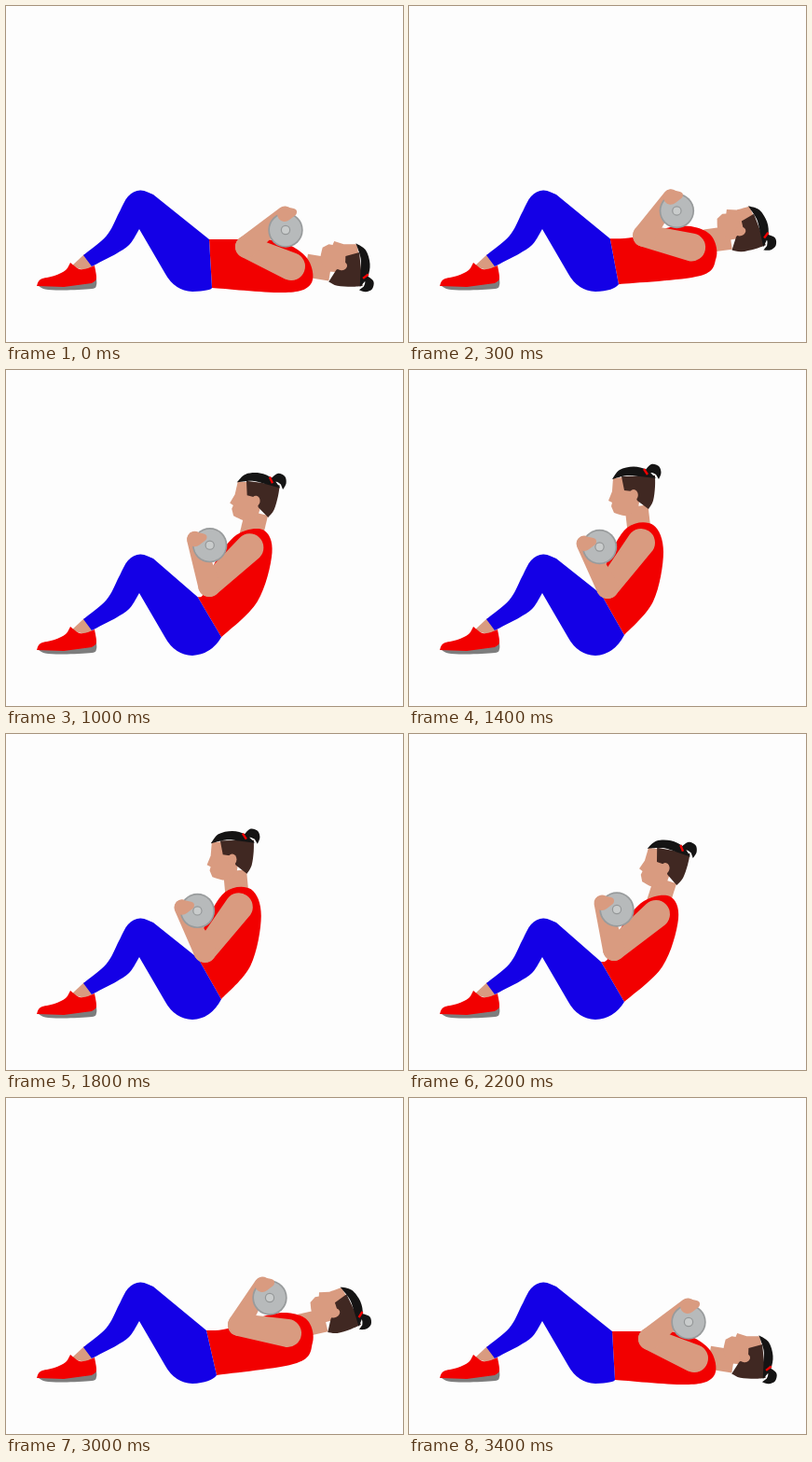
An HTML page with a canvas for the animation above (3500 ms loop, 426 px wide and 360 px high).

```html
<!DOCTYPE html>
<html lang="en">
<head>
<meta charset="utf-8">
<title>Sit-up with weight</title>
<style>
html, body { margin: 0; width: 100%; height: 100%; overflow: hidden; background: #fdfdfd; }
canvas { display: block; width: 426px; height: 360px; }
</style>
</head>
<body>
<canvas id="stage"></canvas>
<script>
const W = 426, H = 360, LOOP = 3500, STEP = 100;
const RED = '#f20000', BLUE = '#1400e6', SKIN = '#d99b80', BROWN = '#402822', BLACK = '#151414';
const canvas = document.getElementById('stage');
const ctx = canvas.getContext('2d');
const dpr = window.devicePixelRatio || 1;
canvas.width = W * dpr;
canvas.height = H * dpr;

// Poses run from lying (0) to upright (4).
const HEAD = [[366, 277, 86], [357.5, 227, 66], [330, 177, 43], [275, 138, 12], [240, 128, 0]];
const NECK = [[322, 278], [316, 244], [303, 210], [267, 182], [247, 172]];
const SHOULDER = [[306, 279], [302, 252], [295, 222], [265, 193], [249, 185]];
const ELBOW = [[258, 258], [250, 243], [238, 234], [220, 231], [213, 233]];
const HAND = [[299, 223], [275, 200], [246, 185], [207, 181], [188, 186]];
const PLATE = [[300, 240], [283, 214], [259.5, 196.5], [223, 188], [204.5, 189.5]];
const TORSO = [
  [218, 250, 250, 250, 280, 250, 308, 258, 326, 275, 327, 298, 300, 307, 221, 302],
  [215, 249, 238, 247, 283, 232, 308, 231, 325, 240, 329, 262, 312, 284, 226, 297],
  [211, 247, 226, 243, 262, 212, 292, 201, 314, 204, 317, 228, 290, 262, 229, 292],
  [206, 244, 214, 240, 228, 207, 252, 179, 280, 174, 289, 198, 272, 249, 231, 287],
  [206, 240, 208, 232, 212, 206, 234, 169, 262, 166, 273, 195, 262, 248, 231, 284]
];
// time (ms), pose
const TIMING = [[0, 0], [600, 2], [1200, 3.7], [1400, 4], [1600, 4.1], [1800, 3.95],
  [2200, 3], [2600, 2.17], [3000, 1], [3400, 0]];

function hermite(a, b, ma, mb, s) {
  const s2 = s * s, s3 = s2 * s;
  return a * (2 * s3 - 3 * s2 + 1) + ma * (s3 - 2 * s2 + s) + b * (3 * s2 - 2 * s3) + mb * (s3 - s2);
}

function poseAt(t) {
  const k = TIMING, last = k.length - 1;
  if (t >= k[last][0]) return k[last][1];
  let i = 0;
  while (t >= k[i + 1][0]) i++;
  const slope = n => n === 0 || n === last ? 0 : (k[n + 1][1] - k[n - 1][1]) / (k[n + 1][0] - k[n - 1][0]);
  const d = k[i + 1][0] - k[i][0];
  return hermite(k[i][1], k[i + 1][1], slope(i) * d, slope(i + 1) * d, (t - k[i][0]) / d);
}

function blend(keys, p) {
  const last = keys.length - 1;
  const i = Math.max(0, Math.min(last - 1, Math.floor(p)));
  return keys[i].map((a, j) => {
    const b = keys[i + 1][j];
    const ma = i > 0 ? (b - keys[i - 1][j]) / 2 : b - a;
    const mb = i + 2 <= last ? (keys[i + 2][j] - a) / 2 : b - a;
    return p > last ? b + mb * (p - last) : hermite(a, b, ma, mb, p - i);
  });
}

function spline(pts) {
  const n = pts.length / 2;
  const at = i => {
    const j = Math.max(0, Math.min(n - 1, i)) * 2;
    return [pts[j], pts[j + 1]];
  };
  ctx.lineTo(pts[0], pts[1]);
  for (let i = 0; i < n - 1; i++) {
    const [a, b, c, d] = [at(i - 1), at(i), at(i + 1), at(i + 2)];
    ctx.bezierCurveTo(b[0] + (c[0] - a[0]) / 6, b[1] + (c[1] - a[1]) / 6,
      c[0] - (d[0] - b[0]) / 6, c[1] - (d[1] - b[1]) / 6, c[0], c[1]);
  }
}

function fill(color, ...parts) {
  ctx.beginPath();
  parts.forEach(spline);
  ctx.closePath();
  ctx.fillStyle = color;
  ctx.fill();
}

function disc(x, y, r, color, ry = r) {
  ctx.beginPath();
  ctx.ellipse(x, y, r, ry, 0, 0, 2 * Math.PI);
  ctx.fillStyle = color;
  ctx.fill();
}

function limb([x1, y1], r1, [x2, y2], r2) {
  const d = Math.hypot(x2 - x1, y2 - y1);
  const dir = Math.atan2(y2 - y1, x2 - x1);
  const half = Math.acos((r1 - r2) / d);
  ctx.beginPath();
  ctx.arc(x1, y1, r1, dir + half, dir - half + 2 * Math.PI);
  ctx.arc(x2, y2, r2, dir - half, dir + half);
  ctx.closePath();
  ctx.fillStyle = SKIN;
  ctx.fill();
}

function drawFoot() {
  fill(SKIN, [84, 266], [93, 278], [88, 284], [70, 279]);
  fill('#7d7d7d', [34, 299, 42, 303.5, 62, 304.5, 92, 303, 97, 299, 97, 292]);
  fill(RED, [69, 275, 64, 283, 52, 289, 37, 293, 33, 300], [62, 301], [92, 297, 97, 292, 95, 278],
    [88, 281, 79, 282, 69, 275]);
}

function drawPants(torso) {
  const [ax, ay] = torso, [hx, hy] = torso.slice(-2);
  ctx.beginPath();
  spline([83, 267, 108, 246, 121, 222, 131, 204, 144, 197.5, 158, 202]);
  ctx.lineTo(ax, ay);
  ctx.lineTo(hx, hy);
  ctx.quadraticCurveTo(220, 305, 200, 306);
  ctx.quadraticCurveTo(181, 305, 171, 287);
  ctx.lineTo(143, 239);
  spline([143, 239, 133, 255, 119, 265, 92, 279]);
  ctx.closePath();
  ctx.fillStyle = BLUE;
  ctx.fill();
}

function drawNeck(head, base) {
  const a = head[2] * Math.PI / 180, c = Math.cos(a), s = Math.sin(a);
  ctx.beginPath();
  ctx.moveTo(head[0] + 4 * c - 18 * s, head[1] + 4 * s + 18 * c);
  ctx.lineTo(base[0], base[1]);
  ctx.lineWidth = 25;
  ctx.strokeStyle = SKIN;
  ctx.stroke();
}

function drawHead([x, y, deg]) {
  ctx.save();
  ctx.translate(x, y);
  ctx.rotate(deg * Math.PI / 180);
  fill(SKIN, [-21, -12, -22, 2], [-26, 12], [-22, 14], [-23, 18], [-20, 25, -6, 28, 6, 20], [9, 0], [0, -14]);
  fill(BROWN, [-12, -14], [-9, 1], [0, 2], [5, 12], [17, 21, 22, 12, 24, -3, 24, -15]);
  disc(1, 6, 4.8, SKIN, 6);
  fill(BLACK, [-22, -11, -14, -21, 1, -24.5, 15, -21, 25, -12], [8, -14, -6, -15, -22, -11]);
  fill(BLACK, [13, -20, 20, -27, 28, -25, 30.5, -18, 28, -11], [25, -16, 20, -18, 14, -16]);
  ctx.beginPath();
  ctx.moveTo(12, -22);
  ctx.lineTo(16, -16);
  ctx.lineWidth = 2.4;
  ctx.strokeStyle = RED;
  ctx.stroke();
  ctx.restore();
}

function drawPlate([x, y]) {
  disc(x, y, 18.7, '#989b9c');
  disc(x, y, 17, '#b7babb');
  disc(x, y, 5.2, '#949798');
  disc(x, y, 4, '#c9cccc');
}

function draw(t) {
  const p = poseAt(t);
  const torso = blend(TORSO, p), head = blend(HEAD, p);
  const elbow = blend(ELBOW, p), hand = blend(HAND, p);
  ctx.setTransform(dpr, 0, 0, dpr, 0, 0);
  ctx.fillStyle = '#fdfdfd';
  ctx.fillRect(0, 0, W, H);
  drawFoot();
  drawNeck(head, blend(NECK, p));
  drawHead(head);
  fill(RED, torso);
  drawPants(torso);
  limb(blend(SHOULDER, p), 15, elbow, 12);
  limb(elbow, 12, hand, 8.5);
  drawPlate(blend(PLATE, p));
  limb(hand, 8, [hand[0] + 9, hand[1] - 2], 4);
}

const start = performance.now();
function tick() {
  const t = (performance.now() - start) % LOOP;
  draw(Math.floor(t / STEP) * STEP);
  requestAnimationFrame(tick);
}
tick();
</script>
</body>
</html>
```
